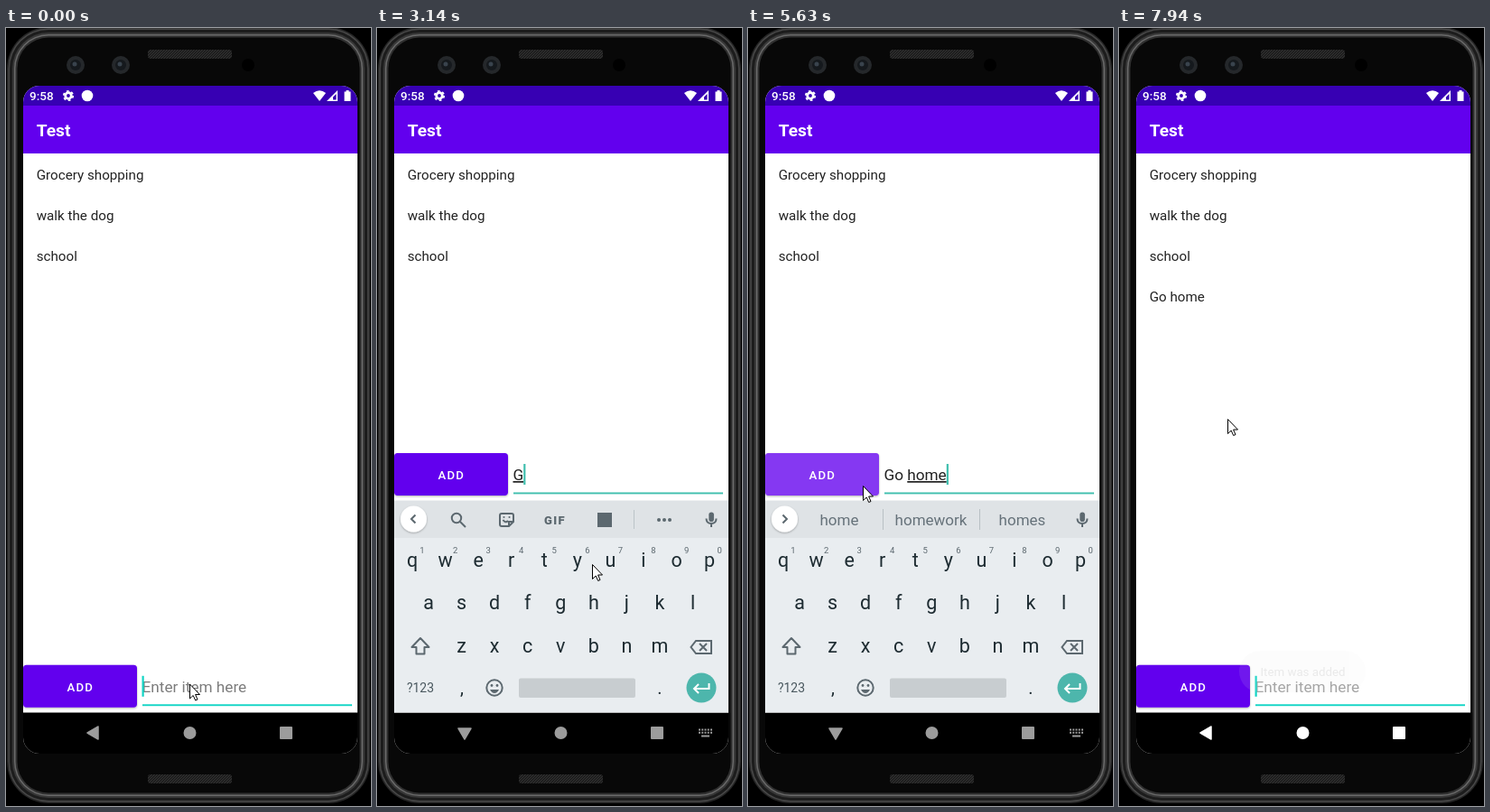
Write an HTML page that moves like this. It is 404 px wide and 862 px high and loops after 8 s.

```html
<!DOCTYPE html>
<html lang="en">
<head>
<meta charset="utf-8">
<title>To-do list demo</title>
<style>
html, body { margin: 0; width: 100%; height: 100%; overflow: hidden; background: #000; }
svg { display: block; width: 404px; height: 862px; font-family: Roboto, sans-serif; }
text { white-space: pre; }
.mid { text-anchor: middle; }
.icon { fill: none; stroke: #5c686f; stroke-width: 2; }
.solid { fill: #5c686f; }
</style>
</head>
<body>
<svg viewBox="0 0 404 862">
  <defs>
    <clipPath id="screen"><rect x="19" y="64" width="370" height="740" rx="18"/></clipPath>
    <pattern id="mesh" width="3" height="3" patternUnits="userSpaceOnUse">
      <rect width="3" height="3" fill="#2c2c2c"/><path d="M0 3L3 0" stroke="#151515"/>
    </pattern>
    <filter id="shadow" x="-20%" y="-20%" width="140%" height="150%">
      <feDropShadow dx="0" dy="1" stdDeviation="1" flood-opacity=".3"/>
    </filter>
  </defs>

  <!-- phone body -->
  <g id="frame"></g>
  <rect x="157" y="24" width="93" height="10" rx="3" fill="url(#mesh)"/>
  <rect x="157" y="827" width="93" height="10" rx="3" fill="url(#mesh)"/>
  <g id="lenses"></g>
  <circle cx="268" cy="41" r="7" fill="#000"/>

  <g clip-path="url(#screen)">
    <rect x="19" y="64" width="370" height="740" fill="#fff"/>
    <rect x="19" y="64" width="370" height="22" fill="#3700b3"/>
    <rect x="19" y="86" width="370" height="53" fill="#6200ee"/>
    <g fill="#fff">
      <text x="26" y="80" font-size="13.500" font-weight="500">9:58</text>
      <text x="33.700" y="120" font-size="19.200" font-weight="600">Test</text>
      <circle cx="69" cy="75" r="3.300" fill="none" stroke="#fff" stroke-width="2.800"/>
      <circle cx="69" cy="75" r="5.200" fill="none" stroke="#fff" stroke-width="1.800" stroke-dasharray="2.700 2.745"/>
      <circle cx="90" cy="75" r="6.300"/>
      <path d="M340 72Q347 66.500 354 72L347 81Z"/>
      <path d="M367 69V81H355Z"/>
      <path d="M365.500 73V79.500H362V76.500Z" fill="#3700b3"/>
      <path d="M374.500 70.500H376.500V69H379.500V70.500H381.500V81H374.500Z"/>
    </g>
    <g id="list" font-size="15.200" fill="#222"></g>

    <g id="entry">
      <rect x="19" y="471" width="126" height="47" rx="3.700" fill="#6200ee" filter="url(#shadow)"/>
      <rect id="press" x="19" y="471" width="126" height="47" rx="3.700" fill="#fff"/>
      <text x="67.500" y="499.800" font-size="13.190" font-weight="500" letter-spacing="1.180" fill="#fff">ADD</text>
      <text id="hint" x="150.500" y="501" font-size="17.200">Enter item here</text>
      <text x="150.500" y="501" font-size="17.200" fill="#222"><tspan id="before"></tspan><tspan id="word" text-decoration="underline"></tspan></text>
      <rect id="line" x="151" y="514.500" width="232" height="1.900"/>
      <rect id="caret" y="483" width="2.200" height="23"/>
    </g>

    <rect x="19" y="758.500" width="370" height="46" fill="#000"/>
    <g id="keyboard">
      <rect x="19" y="523.500" width="370" height="42" fill="#dfe3e6"/>
      <rect x="19" y="565" width="370" height="193.500" fill="#e9edf0"/>
      <circle cx="40.500" cy="544" r="14.500" fill="#fff" filter="url(#shadow)"/>
      <path id="chevron" d="M42.500 539.500L38 544L42.500 548.500" class="icon"/>
      <g id="tools">
        <circle cx="88" cy="543" r="5.200" class="icon"/><path d="M92 547L98 553" class="icon"/>
        <path d="M138 538H149Q151 538 151 540V547L146 552H138Q136 552 136 550V540Q136 538 138 538ZM151 547H146V552M139.500 545Q142 549 145 546" class="icon" stroke-width="1.600"/>
        <circle cx="140.500" cy="542" r="1" class="solid"/><circle cx="146.500" cy="542" r="1" class="solid"/>
        <text x="197" y="549.500" class="mid solid" font-size="13" font-weight="900" letter-spacing="1.300">GIF</text>
        <rect x="244" y="537" width="16" height="16" class="solid"/>
        <path d="M284.500 534V555" stroke="#bcc4c8"/>
        <g class="solid"><circle cx="312" cy="545" r="2"/><circle cx="318" cy="545" r="2"/><circle cx="324" cy="545" r="2"/></g>
      </g>
      <g id="suggestions" font-size="17">
        <path d="M149.500 533V556M256.500 533V556" stroke="#b8c0c4"/>
      </g>
      <rect x="367.300" y="536.500" width="5.600" height="10.500" rx="2.800" class="solid"/>
      <path d="M364.500 543.500Q364.500 549 370 549Q375.500 549 375.500 543.500M370 549V553" class="icon" stroke-width="1.600"/>
      <g id="keys" class="mid" fill="#1d2b31"></g>
      <path d="M48 676L57.500 686H52.500V693.500H43.500V686H38.500Z" class="icon" stroke-linejoin="round"/>
      <path d="M353 679H370V693H353L347.500 686ZM357 682L365 690M365 682L357 690" class="icon"/>
      <circle cx="130" cy="731" r="8.700" class="icon"/>
      <g class="solid"><circle cx="127" cy="728.500" r="1.400"/><circle cx="133" cy="728.500" r="1.400"/><path d="M125 733H135Q133 737 130 737Q127 737 125 733Z"/></g>
      <rect x="157" y="720.500" width="129" height="21.500" rx="2" fill="#c8cdd0"/>
      <circle cx="359" cy="731" r="16.500" fill="#4db6ac"/>
      <path d="M367.500 726V732H351.500M356 727L351 732L356 737" fill="none" stroke="#fff" stroke-width="2"/>
    </g>

    <g id="nav">
      <path id="back" d="M90 781L102 774V788Z" stroke-width="1.500" stroke-linejoin="round"/>
      <circle cx="203.500" cy="781" r="7"/>
      <rect x="303" y="774" width="14" height="14" rx="1"/>
      <g id="imeIcon" fill="none" stroke="#9c9c9c" stroke-width="2">
        <path d="M356 777.500H371M356 780.800H371" stroke-dasharray="2 1.250"/><path d="M359 784.500H368"/>
      </g>
    </g>
    <g id="toast">
      <rect x="133" y="690" width="140" height="46" rx="23" fill="#ebebeb"/>
      <text x="203.500" y="718" class="mid" font-size="13.300" fill="#333">Item was added</text>
    </g>
  </g>
  <path id="mouse" d="M.5.5V16.500L4.200 13L6.700 18.500L9 17.500L6.600 12H11.500Z" fill="#fff" stroke="#000"/>
</svg>
<script>
const $ = id => document.getElementById(id);
const set = (id, attrs) => {
  for (const name in attrs) $(id).setAttribute(name, attrs[name]);
};
const show = (id, visible) => { $(id).style.display = visible ? '' : 'none'; };
const add = (id, markup) => $(id).insertAdjacentHTML('beforeend', markup);
const label = (x, y, text, attrs = '') => `<text x="${x}" y="${y}" ${attrs}>${text}</text>`;

// Metal rim: nested shells from the outer edge inwards.
[[1, '#262626'], [2.5, '#484848'], [4, '#1c1c1c'], [7, '#383838'], [9, '#6a6a6a'], [10.5, '#303030'], [12.5, '#080808']]
  .forEach(([inset, color]) => add('frame',
    `<rect x="${inset}" y="${inset - 2}" width="${404 - 2 * inset}" height="${862 - 2 * inset}" rx="${47 - inset}" fill="${color}"/>`));
for (const x of [77, 127])
  add('lenses', `<circle cx="${x}" cy="41" r="10" fill="#25282b"/><circle cx="${x}" cy="41" r="6" fill="#15191d"/><circle cx="${x - 1}" cy="40" r="2.500" fill="#39434d"/>`);

['Grocery shopping', 'walk the dog', 'school', 'Go home'].forEach((item, i) =>
  add('list', label(33.7, 167.7 + i * 45.2, item, `id="item${i}"`)));

[['qwertyuiop', 39, 597.3], ['asdfghjkl', 57, 644.4], ['zxcvbnm', 93.5, 691.5]].forEach(([row, x, y]) =>
  [...row].forEach((key, i) => add('keys', label(x + i * 36.57, y, key, 'font-size="21.500"'))));
[...'1234567890'].forEach((digit, i) =>
  add('keys', label(50 + i * 36.57, 581.5, digit, 'font-size="9.500" fill="#5c686f"')));
add('keys', label(48, 736, '?123', 'font-size="14" fill="#4a585f"')
  + label(94, 738, ',', 'font-size="20"') + label(313, 738, '.', 'font-size="20"'));
[101, 202.5, 303.5].forEach((x, i) => add('suggestions', label(x, 551, '', `id="guess${i}" class="mid"`)));

// Each track holds [start time, ...values]; values stay until the next entry.
const at = (track, t) => track.findLast(step => step[0] <= t).slice(1);

const mouse = [[0, 203, 726.5], [660, 205, 717], [800, 212, 690], [950, 224, 645], [1090, 234, 612], [1390, 238, 594],
  [4860, 215, 578], [4990, 180, 550], [5110, 140, 517], [5240, 127, 507],
  [5900, 132, 490], [6030, 140, 455], [6160, 151, 420], [6290, 157, 405],
  [6690, 148, 490], [6800, 125, 620], [6930, 100, 740], [7060, 86, 784],
  [7640, 95, 640], [7790, 112, 480], [7940, 120, 433]];
const typed = [[0, ''], [3020, 'G'], [3160, 'Go'], [3730, 'Go '], [3870, 'Go h'], [4000, 'Go ho'],
  [4140, 'Go hom'], [4290, 'Go home'], [5640, '']];
const guesses = [[0], [3160, 'Go', 'Good', 'Got'], [3730, 'to', 'home', 'back'], [4000, 'ho', '*home', 'to'],
  [4290, 'home', 'homework', 'homes'], [5640]];
const caretToggles = [520, 1090, 1540, 2090, 2590, 3020, 4730, 5240, 6030, 6560, 7060, 7640];
// offset, opacity, back-arrow angle
const keyboard = [[0, 240, 0, 0], [120, 20, .6, -25], [240, 1.2, .93, -70], [380, 0, 1, -90],
  [7490, 60, .5, -50], [7640, 240, 0, 0]];
const press = [[0, 0], [5510, .22], [5640, .1], [5770, 0]];
const toast = [[0, 0], [5770, .3], [5900, .7], [6030, .97], [7790, .6], [7940, .1]];

function draw(t) {
  const [offset, opacity, angle] = at(keyboard, t);
  const [text] = at(typed, t);
  const words = at(guesses, t);
  const raised = t >= 120 && t < 7490;
  const accent = raised ? '#40bfae' : '#12d5c5';
  const cut = text.lastIndexOf(' ') + 1;

  set('mouse', { transform: `translate(${at(mouse, t)})` });
  set('keyboard', { transform: `translate(0 ${offset})`, opacity });
  const navColor = t >= 7790 ? '#fff' : '#9c9c9c';
  set('nav', { fill: navColor });
  set('back', { stroke: navColor, transform: `rotate(${angle} 97 781)` });
  show('imeIcon', raised);

  set('entry', { transform: `translate(0 ${raised ? 0 : 234.8})` });
  set('press', { opacity: at(press, t)[0] });
  set('hint', { fill: t < 120 ? '#7c7c7c' : '#9e9e9e' });
  show('hint', !text);
  $('before').textContent = text.slice(0, cut);
  $('word').textContent = text.slice(cut);
  const width = text ? $('before').parentNode.getComputedTextLength() : 0;
  set('caret', { x: 150.5 + width, fill: accent });
  set('line', { fill: accent });
  show('caret', caretToggles.filter(time => time <= t).length % 2 === 0);

  show('tools', !words.length);
  show('suggestions', words.length);
  set('chevron', { transform: words.length ? 'rotate(180 40.5 544)' : '' });
  words.forEach((word, i) => {
    const bold = word.startsWith('*');
    $('guess' + i).textContent = word.replace('*', '');
    set('guess' + i, { fill: bold ? '#000' : '#66727a', 'font-weight': bold ? 700 : 400 });
  });

  show('item3', t >= 5640);
  set('toast', { opacity: at(toast, t)[0] });
}

const start = performance.now();
function tick() {
  draw((performance.now() - start) % 8000);
  requestAnimationFrame(tick);
}
tick();
</script>
</body>
</html>
```
